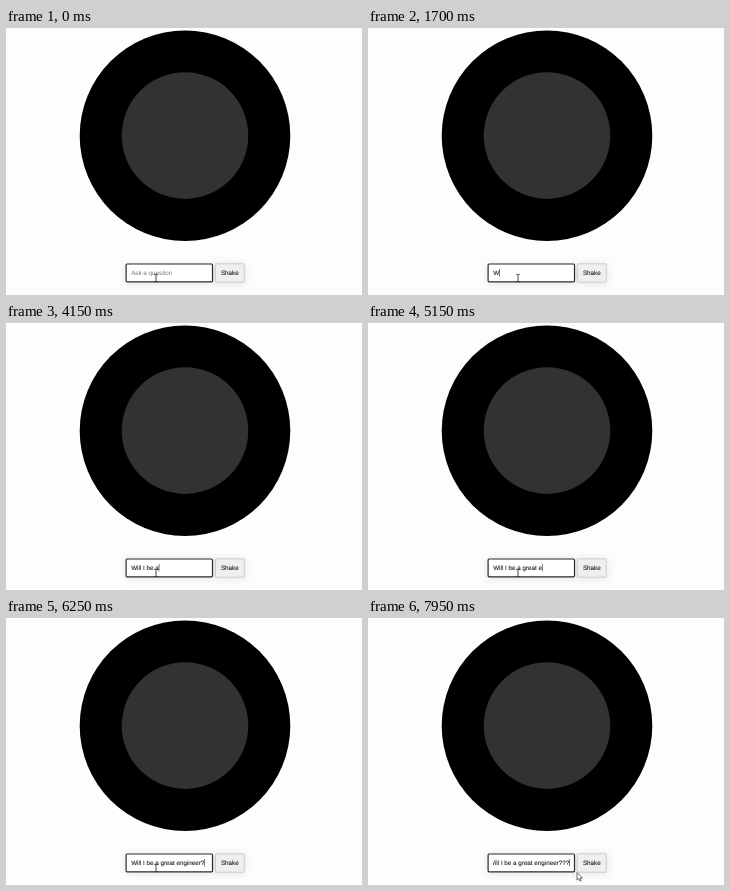
Write an HTML page that moves like this. It is 356x267 px and loops after 8 s.

```html
<!DOCTYPE html>
<html lang="en">
<head>
<meta charset="utf-8">
<title>Magic ball</title>
<style>
  html, body { margin: 0; width: 100%; height: 100%; overflow: hidden; background: #fefdfe; }
  svg { display: block; width: 356px; height: 267px; }
  text {
    font: 6.27px "Liberation Sans", Arial, sans-serif;
    font-kerning: none;
    text-rendering: geometricPrecision;
    white-space: pre;
  }
  .form { filter: drop-shadow(0 1px 4px rgba(0, 0, 0, .1)); }
  .dark { fill: #222; stroke: #222; stroke-width: .1; }
</style>
</head>
<body>
<svg viewBox="0 0 356 267">
  <clipPath id="field"><rect x="124.9" y="237" width="77.2" height="16"/></clipPath>
  <circle cx="179" cy="107.7" r="105.3"/>
  <circle cx="179" cy="107.6" r="63.3" fill="#333233"/>

  <g class="form">
    <rect x="120.1" y="236" width="86.4" height="17.8" rx="1" fill="#fff" stroke="#2a2a2a" stroke-width="1.2"/>
    <rect x="209.3" y="235.8" width="29" height="18.4" rx=".6" fill="#efefef" stroke="#c2c2c2" stroke-width=".8"/>
  </g>
  <text class="dark" x="214.9" y="246.8">Shake</text>

  <g clip-path="url(#field)">
    <text id="hint" x="125.2" y="246.8" fill="#777">Ask a question</text>
    <text id="typed" class="dark" y="246.8"></text>
    <rect id="caret" y="241" width=".6" height="7.4" fill="#222"/>
  </g>

  <path id="beam" fill="none" stroke="#333" stroke-width=".9"
    d="M-1.9-3.7Q-.2-3.7 0-2.9Q.2-3.7 1.9-3.7M0-2.9V2.9M-1.9 3.7Q-.2 3.7 0 2.9Q.2 3.7 1.9 3.7"/>
  <path id="arrow" d="M0 0V7.6L1.8 6L3 8.7L4.2 8.2L3 5.5H5.4Z" fill="#fff" stroke="#333" stroke-width=".7"/>
</svg>
<script>
  const LOOP = 8000, BLINK = 500, FOCUS = 450, LEFT = 125.2, RIGHT = 201.2;
  // Typing bursts: text, start, time per key
  const BURSTS = [
    ["W", 1700, 0], ["ill ", 2300, 130], ["I ", 3050, 200], ["be a g", 3550, 200],
    ["reat engineer", 4650, 100], ["?", 6150, 0], ["??", 6700, 200]
  ];
  const keys = BURSTS.flatMap(([text, start, step]) =>
    [...text].map((char, i) => ({ char, time: start + i * step })));
  const [hint, typed, caret, beam, arrow] =
    ["hint", "typed", "caret", "beam", "arrow"].map(id => document.getElementById(id));

  const show = (el, on) => el.setAttribute("visibility", on ? "visible" : "hidden");
  const move = (el, x, y) => el.setAttribute("transform", `translate(${x} ${y})`);

  function drawField(t) {
    const pressed = keys.filter(key => key.time <= t);
    const text = pressed.map(key => key.char).join("");
    if (typed.textContent !== text) typed.textContent = text;
    const width = text ? typed.getComputedTextLength() : 0;
    const x = Math.min(LEFT, RIGHT - width);
    typed.setAttribute("x", x);
    show(hint, !text);

    const since = t - (text ? pressed[pressed.length - 1].time : FOCUS);
    caret.setAttribute("x", x + width);
    show(caret, since >= 0 && since % (2 * BLINK) < BLINK);
  }

  // The pointer leaves the field in a shallow dip
  function drawPointer(t) {
    const k = Math.min(1, Math.max(0, (t - 7600) / 350));
    const x = 150 + 59 * k * k * (3 - 2 * k);
    const y = 250 + 4.5 * k + 4 * Math.sin(Math.PI * k);
    const inside = y < 253.5;
    for (const el of [beam, arrow]) move(el, x, y);
    show(beam, inside);
    show(arrow, !inside);
  }

  function tick() {
    const t = performance.now() % LOOP;
    drawField(t);
    drawPointer(t);
    requestAnimationFrame(tick);
  }
  tick();
</script>
</body>
</html>
```
